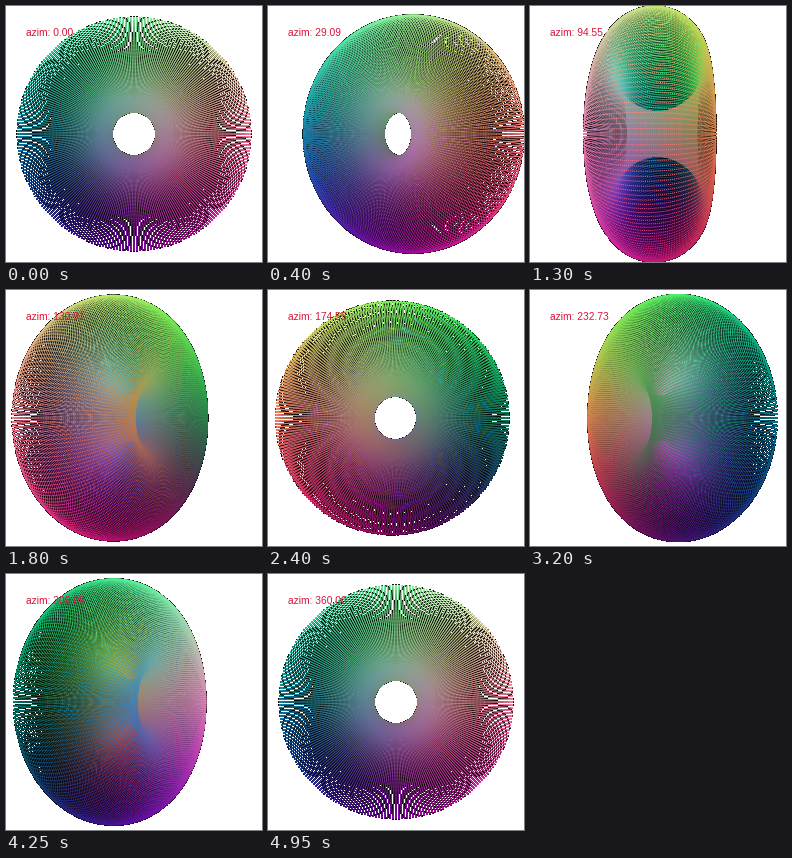
A matplotlib script for the animation above (5000 ms loop, 256 by 256 pixels).

```python
import numpy as np
import matplotlib.pyplot as plt
from matplotlib.animation import FuncAnimation

SIZE = 256
FRAMES = 100
CAM_DIST = 10
FOCAL = SIZE / 2 / np.tan(np.radians(30))  # 60 degree field of view
MAJOR, MINOR = 3, 2
STEPS = 256

# Torus point cloud
angles = np.linspace(0, 2 * np.pi, STEPS, endpoint=False)
u, v = (g.ravel() for g in np.meshgrid(angles, angles))
radius = MAJOR + MINOR * np.cos(v)
points = np.stack([radius * np.cos(u), radius * np.sin(u), MINOR * np.sin(v)])

# Position in space gives the colour
colors = points.T / (2 * (MAJOR + MINOR)) + 0.5


def project(azim):
    """Screen position and depth of every point, turned about the vertical."""
    x, y, z = points
    c, s = np.cos(azim), np.sin(azim)
    depth = CAM_DIST - (x * s + z * c)
    px = SIZE / 2 + FOCAL * (x * c - z * s) / depth
    py = SIZE / 2 - FOCAL * y / depth
    return px, py, depth


def splat(px, py):
    """Pixel index and coverage of one-pixel squares over their 2 x 2 cells."""
    col, row = np.floor(px - 0.5), np.floor(py - 0.5)
    fx, fy = px - 0.5 - col, py - 0.5 - row
    cols = np.stack([col, col + 1, col, col + 1], axis=1).astype(int)
    rows = np.stack([row, row, row + 1, row + 1], axis=1).astype(int)
    cover = np.stack([(1 - fx) * (1 - fy), fx * (1 - fy),
                      (1 - fx) * fy, fx * fy], axis=1)
    inside = (cols >= 0) & (cols < SIZE) & (rows >= 0) & (rows < SIZE)
    return rows * SIZE + cols, np.where(inside, cover, 0), inside


def render(azim):
    px, py, depth = project(azim)
    near_first = np.argsort(depth)
    pixel, cover, inside = splat(px[near_first], py[near_first])
    owner = np.repeat(near_first, 4).reshape(-1, 4)
    pixel, cover, owner = pixel[inside], cover[inside], owner[inside]

    # Group by pixel, keeping near points first
    order = np.argsort(pixel.astype(np.uint16), kind="stable")
    pixel, cover, owner = pixel[order], cover[order], owner[order]

    # Light left over for each dot after the nearer ones in its pixel
    fade = np.log1p(-np.minimum(cover, 0.999))
    before = np.cumsum(fade) - fade
    counts = np.bincount(pixel, minlength=SIZE * SIZE)
    starts = np.cumsum(counts) - counts
    used = counts > 0
    base = np.repeat(before[starts[used]], counts[used])
    weight = cover * np.exp(before - base)

    def total(values):
        return np.bincount(pixel, values, minlength=SIZE * SIZE)

    # Partly covered pixels darken towards black, empty ones stay white
    image = np.stack([total(weight * colors[owner, k]) for k in range(3)], axis=1)
    image[total(weight) < 0.02] = 1
    return np.clip(image, 0, 1).reshape(SIZE, SIZE, 3)


fig = plt.figure(figsize=(4, 4), dpi=64, facecolor="white")
ax = fig.add_axes([0, 0, 1, 1])
ax.axis("off")
picture = ax.imshow(render(0), interpolation="nearest", aspect="auto")
label = fig.text(20 / SIZE, 1 - 30 / SIZE, "", fontsize=11.5,
                 family="Liberation Sans", color="crimson")


def update(i):
    azim = 360 * i / (FRAMES - 1)
    picture.set_data(render(np.radians(azim)))
    label.set_text(f"azim: {azim:.2f}")
    return picture, label


anim = FuncAnimation(fig, update, frames=FRAMES, interval=50, repeat=True)
plt.show()
```
